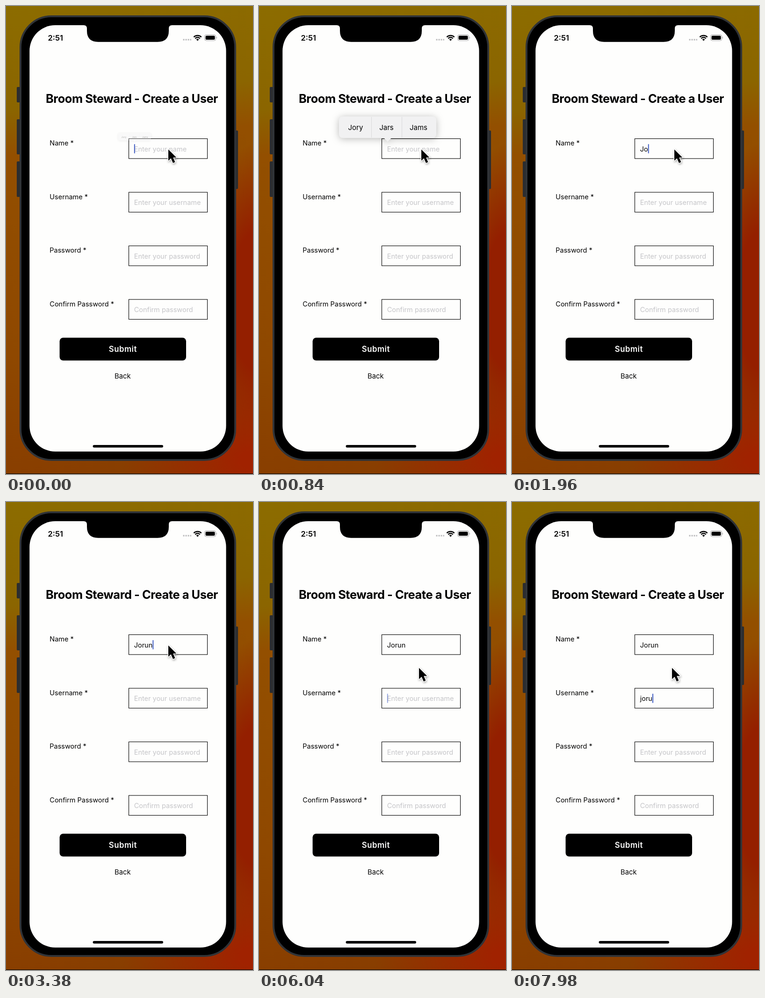
Animation of 528 by 1000 pixels, one loop 8000 ms. Source, as an HTML page:

```html
<!DOCTYPE html>
<html lang="en">
<head>
<meta charset="utf-8">
<title>Create a User</title>
<style>
  html, body { margin: 0; width: 528px; height: 1000px; overflow: hidden; }
  body {
    background:
      radial-gradient(ellipse 280px 190px at 528px 970px, #a02200 10%, transparent),
      radial-gradient(ellipse 150px 340px at 545px 630px, #941f00 45%, transparent),
      linear-gradient(173deg, #8c6c00, #8b6500 21%, #934f00 30%, #8f4800 70%, #873c00);
  }
  svg { display: block; font: 14.5px Inter, sans-serif; }
  .title { font-weight: 700; font-size: 25.4px; letter-spacing: -.45px; text-anchor: end; }
  .clock { font-weight: 600; font-size: 16.4px; }
  .submit { font-weight: 600; font-size: 16.8px; letter-spacing: .5px; fill: #fefefd; }
  .hint { fill: #c5c5c8; }
  .mid { text-anchor: middle; }
  #popup { filter: drop-shadow(0 2px 8px #0004); }
  #pointer { filter: drop-shadow(1px 2px 2px #0005); }
</style>
</head>
<body>
<svg width="528" height="1000" viewBox="0 0 528 1000">
  <rect y="999" width="528" height="1"/>
  <g fill="#2b2d30">
    <rect x="23" y="173" width="7" height="33" rx="2"/>
    <rect x="23" y="242" width="7" height="75" rx="2"/>
    <rect x="23" y="332" width="7" height="76" rx="2"/>
    <rect x="490" y="266" width="6" height="125" rx="2"/>
  </g>
  <rect x="31" y="22" width="459" height="948" rx="66" stroke="#303337" stroke-width="4"/>
  <rect x="50.3" y="41" width="420.2" height="911" rx="55" fill="#fefefd"/>
  <path d="M166 40H355V41Q348 41 348 48V53Q348 76.7 324 76.7H197Q173 76.7 173 53V48Q173 41 166 41Z"/>

  <text class="clock" x="89.5" y="74">2:51</text>
  <path d="M378.5 72H396" stroke="#b9b9bb" stroke-width="3" stroke-dasharray="3 2"/>
  <path d="M401.4 66.4A11.5 11.5 0 0 1 417.6 66.4M404.3 69.3A7.3 7.3 0 0 1 414.7 69.3" fill="none" stroke="#000" stroke-width="2.5"/>
  <path d="M409.5 74.5L406.6 71.6A4.1 4.1 0 0 1 412.4 71.6Z"/>
  <rect x="424.5" y="61.5" width="24" height="12.5" rx="3.6" fill="none" stroke="#a0a0a2"/>
  <rect x="426.5" y="63.5" width="20" height="8.5" rx="2"/>
  <path d="M450 65.5Q452 67.7 450 70Z" fill="#a0a0a2"/>

  <text class="title" x="453" y="206.5">Broom Steward - Create a User</text>
  <g id="form"></g>
  <rect x="114.6" y="708.7" width="270.4" height="48.8" rx="7.5"/>
  <text class="submit mid" x="249.8" y="739.3">Submit</text>
  <text class="mid" x="249.3" y="796" font-size="14.8">Back</text>
  <rect x="185.6" y="938" width="150.4" height="5.4" rx="2.7"/>

  <rect id="caret" width="2" height="20" rx="1" fill="#4460c4"/>
  <g id="popup">
    <path fill="#f1f1f2" d="M180 236H370Q379 236 379 245V273Q379 282 370 282H283L275 290L267 282H180Q171 282 171 273V245Q171 236 180 236Z"/>
    <path stroke="#d9d9db" d="M240.5 237V281M305.5 237V281"/>
    <g class="mid" font-size="15">
      <text x="206.5" y="265">Jory</text>
      <text x="272.5" y="265">Jars</text>
      <text x="341" y="265">Jams</text>
    </g>
  </g>
  <path id="pointer" d="M0 0V24L5.6 19L10 29L14.4 27L10.2 17.3H17.3Z" stroke="#fefefd" stroke-width="3" stroke-linejoin="round" paint-order="stroke"/>
</svg>
<script>
const LOOP = 8000;
const $ = id => document.getElementById(id);
const clamp = v => Math.min(1, Math.max(0, v));
const easeOut = v => 1 - (1 - clamp(v)) ** 3;

const fields = [
  ['Name *', 'Enter your name'],
  ['Username *', 'Enter your username'],
  ['Password *', 'Enter your password'],
  ['Confirm Password *', 'Confirm password'],
].map(([label, hint], i) => {
  const y = 283.5 + i * 114.5;
  $('form').insertAdjacentHTML('beforeend', `
    <text x="93.3" y="${y + 14.5}">${label}</text>
    <rect x="262.5" y="${y}" width="168" height="42.5" fill="none" stroke="#000" stroke-width="1.1"/>
    <text x="273.7" y="${y + 27}" class="hint">${hint}</text>`);
  return { y, hint, node: $('form').lastElementChild };
});

// Each key time reveals one more letter while the field holds focus.
const entries = [
  { field: fields[0], text: 'Jorun', from: 0, to: 4000, keys: [1380, 1850, 2200, 2600, 3000] },
  { field: fields[1], text: 'joru', from: 5450, to: LOOP, keys: [6500, 6950, 7350, 7700] },
];

function blink(ms) {
  const p = ms % 1000;
  return p < 500 ? 1 : p < 850 ? 1 - clamp((p - 500) / 200) : (p - 850) / 150;
}

function draw(t) {
  let caretOpacity = 0;
  for (const { field, text, from, to, keys } of entries) {
    const count = keys.filter(k => k <= t).length;
    field.node.textContent = count ? text.slice(0, count) : field.hint;
    field.node.setAttribute('class', count ? '' : 'hint');
    if (t >= from && t < to) {
      const width = count ? field.node.getComputedTextLength() : 0;
      $('caret').setAttribute('x', 273.8 + width);
      $('caret').setAttribute('y', field.y + 11.5);
      caretOpacity = blink(t - (count ? keys[count - 1] : from));
    }
  }
  $('caret').setAttribute('opacity', caretOpacity);

  const shown = easeOut(t / 300);
  const gone = clamp((t - 1390) / 240);
  const scale = (.33 + .67 * shown) * (1 - .15 * gone);
  $('popup').setAttribute('transform', `translate(275 290) scale(${scale}) translate(-275 -290)`);
  $('popup').setAttribute('opacity', (.3 + .7 * clamp(t / 150)) * (1 - gone * gone));

  const move = easeOut((t - 3850) / 750);
  $('pointer').setAttribute('transform', `translate(${347 - 5 * move} ${306.5 + 48 * move})`);
}

function tick() {
  draw(performance.now() % LOOP);
  requestAnimationFrame(tick);
}
tick();
</script>
</body>
</html>
```
